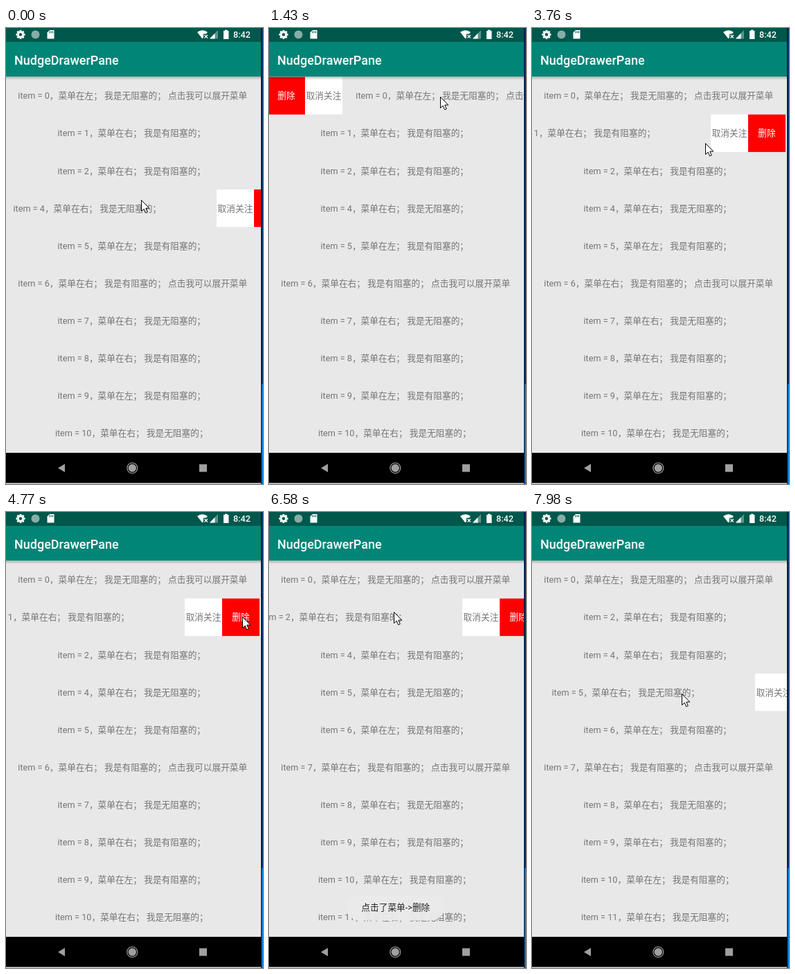
An HTML page with a canvas for the animation above (8000 ms loop, 371x658 px).

```html
<!DOCTYPE html>
<html lang="zh">
<head>
<meta charset="utf-8">
<style>
  html, body { margin: 0; width: 100%; height: 100%; overflow: hidden; background: #000; }
  canvas { display: block; }
</style>
</head>
<body>
<canvas id="stage" width="371" height="658"></canvas>
<script>
const ctx = document.getElementById('stage').getContext('2d');
const FONT = 'Roboto, "Noto Sans CJK SC", "Noto Sans CJK", sans-serif';
const WIDTH = 368, CENTER = 182.8, LIST_TOP = 70.7, LIST_END = 613, ROW = 54.1, CELL = 54;
const WHITE = '#fff', GREY = '#757575', BAR = '#00574b', NAV = '#a0a0a0';
const LOOP = 8000, TRAVEL = 480, SETTLE = 180, DELETE_AT = 5240;

// Pointer stops: arrival time, x, y. A move takes at most TRAVEL ms.
const STOPS = [
  [-200, 259, 248], [0, 195, 248], [250, 160, 247], [740, 138, 97], [1430, 247, 99],
  [1780, 273, 166], [2600, 161, 152], [3200, 270, 157], [3480, 185, 157], [3760, 250, 166],
  [3990, 273, 153], [4700, 341, 151], [5650, 322, 164], [6200, 269, 150], [6580, 180, 144],
  [6880, 205, 260], [7600, 262, 262], [7980, 216, 262]
];

// A row follows the pointer from press to release, snaps open, then closes.
const SWIPES = [
  { row: 3, press: -200, release: 250, close: 1050 },
  { row: 0, press: 740, release: 1430, close: 2150 },
  { row: 1, press: 3200, release: 3480, close: DELETE_AT },
  { row: 1, press: 6200, release: 6580, close: 7650 },
  { row: 3, press: 7600, release: LOOP, close: LOOP }
];

const numbers = Array.from({ length: 12 }, (_, i) => i).filter(n => n !== 3);
const remaining = [...numbers, 11].filter((n, i, all) => n !== 1 && all.indexOf(n) === i);

const mix = (a, b, p) => a + (b - a) * p;

function ease(t, start, length) {
  const p = Math.min(1, Math.max(0, (t - start) / length));
  return p * p * (3 - 2 * p);
}

function pointerAt(t) {
  const i = STOPS.findIndex(stop => stop[0] > t);
  const [end, x, y] = STOPS.at(i);
  if (i <= 0) return { x, y };
  const [left, fromX, fromY] = STOPS[i - 1];
  const start = Math.max(left, end - TRAVEL);
  const p = ease(t, start, end - start);
  return { x: mix(fromX, x, p), y: mix(fromY, y, p) };
}

const opensLeft = row => row % 4 === 0;

function swipeOffset({ row, press, release, close }, t) {
  if (t < press) return 0;
  const drag = pointerAt(Math.min(t, release)).x - pointerAt(press).x;
  const limit = opensLeft(row) ? 2 * CELL : -2 * CELL - 2;
  const reach = Math.min(Math.abs(limit), Math.max(0, drag * Math.sign(limit))) * Math.sign(limit);
  return mix(reach, limit, ease(t, release, SETTLE)) * (1 - ease(t, close, SETTLE));
}

const rowOffset = (row, t) =>
  SWIPES.filter(s => s.row === row).reduce((sum, s) => sum + swipeOffset(s, t), 0);

function rect(x, y, w, h, color) {
  ctx.fillStyle = color;
  ctx.fillRect(x, y, w, h);
}

function text(string, x, y, color, align = 'center', size = 12.7, weight = 400) {
  ctx.font = `${weight} ${size}px ${FONT}`;
  ctx.textAlign = align;
  ctx.fillStyle = color;
  ctx.fillText(string, x, y);
}

function polygon(points, color) {
  ctx.beginPath();
  points.forEach(([x, y]) => ctx.lineTo(x, y));
  ctx.closePath();
  ctx.fillStyle = color;
  ctx.fill();
}

function disc(x, y, r, color) {
  ctx.beginPath();
  ctx.arc(x, y, r, 0, 2 * Math.PI);
  ctx.fillStyle = color;
  ctx.fill();
}

function ring(x, y, r, width, color) {
  ctx.beginPath();
  ctx.arc(x, y, r, 0, 2 * Math.PI);
  ctx.lineWidth = width;
  ctx.strokeStyle = color;
  ctx.stroke();
}

function drawCell(label, x, top, back, color) {
  rect(x, top, CELL, ROW, back);
  text(label, x + CELL / 2, top + 31.6, color);
}

function drawRow(row, number, offset, shift = 0, alpha = 1) {
  const top = LIST_TOP + row * ROW + shift, left = opensLeft(row);
  const side = left ? '左' : '右', block = row % 3 ? '有' : '无';
  const hint = row % 5 ? '' : '点击我可以展开菜单';
  ctx.globalAlpha = alpha;
  text(`item = ${number}，菜单在${side}； 我是${block}阻塞的； ${hint}`, CENTER + offset, top + 31.6, GREY);
  if (offset) {
    const start = left ? offset - 2 * CELL - 2 : WIDTH + offset;
    drawCell('删除', left ? start : start + CELL, top, '#f00', WHITE);
    drawCell('取消关注', left ? start + CELL : start, top, WHITE, GREY);
  }
  ctx.globalAlpha = 1;
}

function drawList(t) {
  ctx.save();
  ctx.beginPath();
  ctx.rect(0, 70, WIDTH, LIST_END - 70);
  ctx.clip();
  rect(0, 70, WIDTH, LIST_END - 70, '#e8e8e8');
  // The removed row fades, then the rows below slide up and cross-fade to new labels.
  const fade = ease(t, DELETE_AT, SETTLE);
  const move = ease(t, DELETE_AT + SETTLE, 220);
  for (let row = 0; row < 10; row++) {
    const offset = rowOffset(row, t);
    if (row === 0) drawRow(row, 0, offset);
    else {
      if (move < 1) drawRow(row, numbers[row], offset, row > 1 ? -ROW * move : 0, 1 - (row > 1 ? move : fade));
      if (move > 0) drawRow(row, remaining[row], offset, ROW * (1 - move), move);
    }
  }
  const shadow = ctx.createLinearGradient(0, 70, 0, 75);
  shadow.addColorStop(0, 'rgba(0,0,0,.25)');
  shadow.addColorStop(1, 'rgba(0,0,0,0)');
  rect(0, 70, WIDTH, 5, shadow);
  ctx.restore();
}

function drawStatusIcons() {
  for (let i = 0; i < 8; i++) {
    ctx.save();
    ctx.translate(21, 9.5);
    ctx.rotate(i * Math.PI / 4);
    rect(-1.5, -6.5, 3, 4, WHITE);
    ctx.restore();
  }
  ring(21, 9.5, 3.6, 2.6, WHITE);
  disc(42.5, 9.5, 6, '#86aea7');
  // Memory card
  polygon([[63, 3], [69.5, 3], [69.5, 15.5], [59.5, 15.5], [59.5, 6.5]], WHITE);
  for (let x = 62.3; x < 68; x += 2.3) rect(x, 4.5, 1.1, 2.8, BAR);
  // Wi-Fi fan with a small cross
  ctx.beginPath();
  ctx.moveTo(283.5, 15.5);
  ctx.lineTo(276, 6);
  ctx.quadraticCurveTo(283.5, 0.5, 291, 6);
  ctx.fillStyle = WHITE;
  ctx.fill();
  rect(285, 8.5, 7, 7, BAR);
  ctx.beginPath();
  ctx.moveTo(286.5, 10); ctx.lineTo(291, 14.5);
  ctx.moveTo(291, 10); ctx.lineTo(286.5, 14.5);
  ctx.lineWidth = 1.3;
  ctx.strokeStyle = WHITE;
  ctx.stroke();
  // Signal and battery
  polygon([[306, 3], [306, 15.5], [294, 15.5]], '#5b928a');
  polygon([[301.5, 7.7], [301.5, 15.5], [294, 15.5]], WHITE);
  rect(314, 4, 7.5, 12, WHITE);
  rect(316, 2.7, 3.5, 2, WHITE);
  text('8:42', 328, 14.3, WHITE, 'left', 12.7, 500);
}

function drawFrame() {
  rect(0, 0, WIDTH, 20, BAR);
  rect(0, 20, WIDTH, 50, '#008577');
  text('NudgeDrawerPane', 12, 52.5, WHITE, 'left', 18, 500);
  drawStatusIcons();
  rect(0, LIST_END, WIDTH, 44, '#000');
  polygon([[75, 635], [85, 629], [85, 641]], NAV);
  disc(182.3, 635, 5.7, NAV);
  ring(182.3, 635, 7.5, 1.2, NAV);
  rect(279, 629.5, 11, 11, NAV);
  rect(0, 656.5, WIDTH, 1.5, '#d8d8d8');
  // Desktop showing beside the window
  rect(368, 0, 3, 514, '#07316b');
  rect(368, 514, 3, 144, '#0078d7');
  rect(368, 0, 1, 658, '#04142c');
}

function drawToast(t) {
  const alpha = ease(t, 4780, 250) * (1 - ease(t, 7180, 220));
  ctx.globalAlpha = alpha * 0.94;
  ctx.beginPath();
  ctx.roundRect(112, 552.5, 141, 37, 18.5);
  ctx.fillStyle = '#eaeaea';
  ctx.fill();
  ctx.globalAlpha = alpha;
  text('点击了菜单->删除', CENTER, 574.6, '#222');
  ctx.globalAlpha = 1;
}

function drawPointer({ x, y }) {
  ctx.save();
  ctx.translate(Math.round(x) + 0.5, Math.round(y) + 0.5);
  polygon([[0, 0], [0, 16], [3.7, 12.6], [6.2, 18.3], [8.8, 17.2], [6.3, 11.6], [11.3, 11.6]], WHITE);
  ctx.lineWidth = 1;
  ctx.strokeStyle = '#000';
  ctx.stroke();
  ctx.restore();
}

function draw(now) {
  const t = now % LOOP;
  drawList(t);
  drawFrame();
  drawToast(t);
  drawPointer(pointerAt(t));
  requestAnimationFrame(draw);
}
requestAnimationFrame(draw);
</script>
</body>
</html>
```
